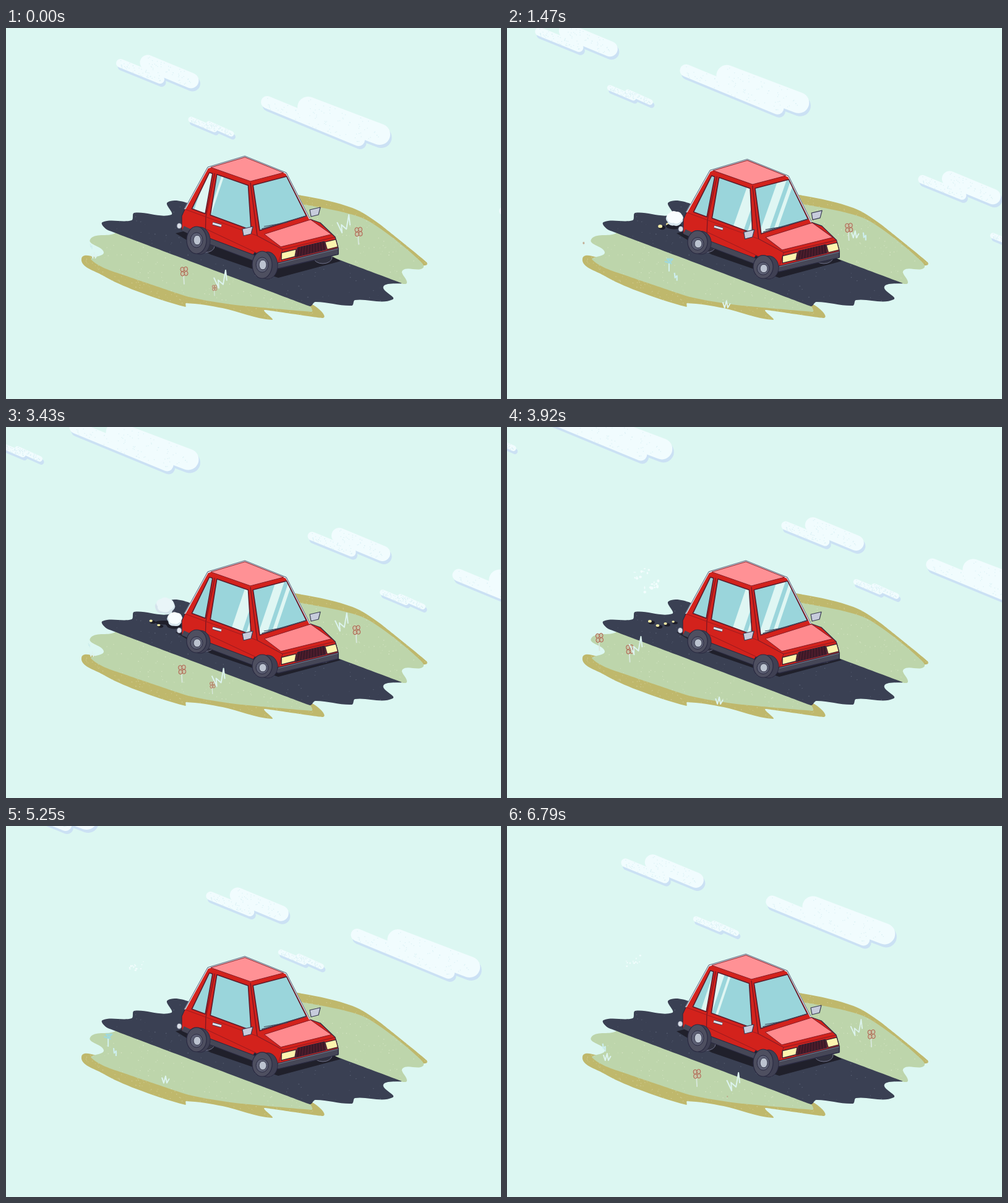
An HTML page with a canvas that plays this animation: 800x600 px, repeating every 6860 ms.

```html
<!DOCTYPE html>
<html>
<head>
<meta charset="utf-8">
<style>
html, body { margin: 0; width: 100%; height: 100%; overflow: hidden; background: #dcf7f2; }
canvas { display: block; }
</style>
</head>
<body>
<canvas id="stage" width="800" height="600"></canvas>
<script>
const stage = document.getElementById('stage');
let g = stage.getContext('2d');
const LOOP = 6860, STEP = 70, LANE = LOOP / 2;
const SPEED = 0.276, SLOPE = 0.38;
const NAVY = '#2b2b42', RED = '#d3221c', WINE = '#861b25', SLATE = '#464757';

const clamp = v => Math.max(0, Math.min(1, v));
const mix = (a, b, u) => [a[0] + (b[0] - a[0]) * u, a[1] + (b[1] - a[1]) * u];

// eased 0 to 1 between two times
function ramp(t, from, to) {
  const u = clamp((t - from) / (to - from));
  return u * u * (3 - 2 * u);
}

function random(seed) {
  return () => {
    seed = (seed * 16807) % 2147483647;
    return seed / 2147483647;
  };
}

function poly(points, fill, line, width = 1, open) {
  g.beginPath();
  for (const [x, y] of points) g.lineTo(x, y);
  if (!open) g.closePath();
  if (fill) { g.fillStyle = fill; g.fill(); }
  if (line) { g.strokeStyle = line; g.lineWidth = width; g.stroke(); }
}

const stroke = (points, color, width) => poly(points, null, color, width, true);

function oval(x, y, rx, ry, fill, line, width = 1) {
  g.beginPath();
  g.ellipse(x, y, rx, ry, 0, 0, 7);
  if (fill) { g.fillStyle = fill; g.fill(); }
  if (line) { g.strokeStyle = line; g.lineWidth = width; g.stroke(); }
}

// ---- ground ----

// closed curve through all points; long sides stay straight
function curve(p, fill) {
  const n = p.length;
  const at = i => p[(i + n) % n];
  const tangent = i => {
    const a = at(i - 1), b = at(i + 1), d = Math.hypot(b[0] - a[0], b[1] - a[1]);
    return [(b[0] - a[0]) / d, (b[1] - a[1]) / d];
  };
  g.beginPath();
  g.moveTo(...at(0));
  for (let i = 0; i < n; i++) {
    const a = at(i), b = at(i + 1), s = tangent(i), e = tangent(i + 1);
    const len = Math.hypot(b[0] - a[0], b[1] - a[1]);
    const k = len > 90 ? 3 : len * 0.32;
    g.bezierCurveTo(a[0] + s[0] * k, a[1] + s[1] * k, b[0] - e[0] * k, b[1] - e[1] * k, b[0], b[1]);
  }
  g.fillStyle = fill;
  g.fill();
}

// a filled curve with random specks inside
function land(points, fill, count, color) {
  curve(points, fill);
  const r = random(count + points.length);
  g.save();
  g.clip();
  g.fillStyle = color;
  for (let i = 0; i < count; i++) {
    const s = 0.5 + r();
    g.fillRect(120 + r() * 570, 265 + r() * 215, s, s);
  }
  g.restore();
}

const olive = points => land(points, '#bfb86c', 2200, '#cfca8f');
const grass = points => land(points, '#bdd5ab', 900, '#d5e4c3');

function paintGround() {
  olive([[122, 373], [156, 400], [210, 425], [290, 451], [291, 445], [350, 453], [430, 472], [418, 456],
    [512, 469], [490, 445], [300, 420], [160, 376]]);
  grass([[165, 326], [176, 332], [136, 342], [158, 363], [138, 375], [200, 403], [292, 434], [380, 449],
    [494, 459], [490, 449]]);
  olive([[450, 272], [478, 271], [560, 291], [605, 318], [680, 379], [640, 376], [500, 310]]);
  grass([[450, 285], [484, 286], [570, 305], [610, 328], [664, 372], [674, 388], [641, 392], [648, 412],
    [638, 413], [460, 345]]);
  land([[156, 314], [203, 311], [207, 299], [267, 302], [261, 282], [296, 284], [638, 412], [610, 418],
    [625, 439], [564, 440], [559, 449], [500, 443], [491, 450], [165, 327]], '#3a4053', 420, '#596074');
}

const ground = document.createElement('canvas');
ground.width = 800;
ground.height = 600;
const view = g;
g = ground.getContext('2d');
paintGround();
g = view;

// ---- clouds ----

// two bars each: start, end, radius
const CLOUDS = [
  [[[185, 57], [249, 83], 7], [[229, 56], [299, 85], 12.5]],
  [[[422, 120], [570, 181], 10], [[488, 128], [604, 172], 17]],
  [[[299, 148], [337, 164], 4.5], [[328, 155], [364, 171], 4.5]]
];

function cloud(bars, x, y) {
  g.lineCap = 'round';
  for (const [dx, dy, color] of [[2.5, 5, '#cbe1f4'], [0, 0, '#f1fcfe']]) {
    g.save();
    g.translate(x + dx, y + dy);
    for (const [a, b, r] of bars) stroke([a, b], color, r * 2);
    g.restore();
  }
  const rnd = random(77);
  g.fillStyle = '#d8f0f4';
  for (const [a, b, r] of bars)
    for (let i = 0; i < 45; i++) {
      const [px, py] = mix(a, b, rnd());
      g.fillRect(x + px, y + py + (rnd() * 2 - 1) * r * 0.9, 1.2, 1.2);
    }
}

function clouds(t) {
  for (let k = 0; k < 2; k++)
    for (const bars of CLOUDS) cloud(bars, 619 * (k - t / LOOP), 239 * (k - t / LOOP));
}

// ---- plants ----

const PLANTS = {
  flower() {
    stroke([[0, 0], [-1, -16]], '#d8e8de', 1.8);
    for (let i = 0; i < 4; i++) {
      const a = i * Math.PI / 2 + 0.7;
      oval(Math.cos(a) * 4, -21 + Math.sin(a) * 5, 3, 3.6, '#c5c6a6', '#b05a48', 1);
    }
  },
  grass() {
    stroke([[-10, -20], [-2, -3], [-3, -16], [5, -9], [9, -32], [11, -15]], '#dcf3ee', 2);
  },
  tuft() {
    stroke([[-7, -11], [-4, -2], [-1, -13], [1, -2], [5, -9]], '#dcf3ee', 2);
  },
  blade() {
    stroke([[-2, -13], [-1, -5], [2, -8], [2, 0]], '#cdeeee', 2.2);
  },
  teal() {
    stroke([[0, 0], [0, -14]], '#d2f0ee', 2);
    stroke([[-7, -16], [0, -14], [6, -20], [-3, -20], [4, -12]], '#9fd9dd', 2.4);
  }
};

// gate: a spot on the lane; times: when each plant passes it
const NEAR = {
  gate: 360, fade: 117,
  flower: { y: 442, sprout: 362, times: [622, 1932, 2407, 3169, 3347] },
  grass: { y: 429, sprout: 420, times: [3379] },
  tuft: { y: 456, sprout: 400, times: [444, 1462, 2646] },
  blade: { y: 442, sprout: 430, times: [1161, 2186, 2624] },
  teal: { y: 431, sprout: 340, times: [1122] }
};
const FAR = {
  gate: 600, fade: 470,
  flower: { y: 362, sprout: 695, times: [1306, 3321] },
  grass: { y: 355, sprout: 600, times: [2316, 3231] },
  tuft: { y: 355, sprout: 640, times: [1056, 1346] },
  blade: { y: 352, sprout: 640, times: [1397, 2178, 2666] },
  teal: { y: 361, sprout: 660, times: [2530] }
};

function plants(lane, phase) {
  for (const kind in PLANTS) {
    const { y, sprout, times } = lane[kind];
    for (const time of times) {
      const age = (phase - time + LANE * 1.5) % LANE - LANE / 2;
      const way = SPEED * age, x = lane.gate - way;
      const size = clamp((sprout - x) / 40) * clamp((x - lane.fade) / 32);
      if (size < 0.03) continue;
      g.save();
      g.translate(x, y - way * SLOPE);
      g.scale(size, size);
      PLANTS[kind]();
      g.restore();
    }
  }
}

// ---- exhaust ----

const PUFFS = [1370, 2040, 3155, 3355, 4190, 4405, 5380, 5860];

function ball(r, color, lift, rnd) {
  for (let i = 0; i < 6; i++) {
    const a = i * 1.05 + rnd() * 0.5;
    oval(Math.cos(a) * r * 0.42, Math.sin(a) * r * 0.32 + lift, r * 0.58, r * 0.5, color);
  }
}

function smoke(t) {
  for (const start of PUFFS) {
    const age = t - start;
    if (age < 0 || age > 950) continue;
    const rnd = random(start), r = 18 - 11 * Math.exp(-age / 80) - age * 0.005;
    if (age < 480) oval(278 - 0.08 * age, 323 - age * 0.025, r * 0.9, 6 - age / 100, '#1f1f2b');
    g.save();
    g.translate(279 - 0.08 * age, 318 - 0.107 * age);
    if (age < 480) {
      ball(r, '#d5e4ec', 1.5, rnd);
      ball(r * 0.9, age < 230 ? '#f8fdff' : '#e9f5f8', -1, rnd);
    } else {
      const fade = 1.4 - age / 1000;
      for (let i = 0; i < 13; i++) {
        const u = rnd() * 2 - 1;
        oval(u * 12, rnd() * 12 - 6 - u * 5, (1 + rnd() * 2.5) * fade, (1 + rnd() * 2.5) * fade, '#f2fdfd');
      }
    }
    g.restore();
  }
}

function sparks(t) {
  for (let i = 0; i < 24; i++) {
    const u = (t - 1120 - i * 150) / 620, rnd = random(500 + i * 3700);
    rnd();
    if (u < 0.1 || u > 1) continue;
    const x = 277 - u * 52, y = 313 + rnd() * 10, s = (2 + rnd() * 3.5) * (1 - u * 0.5);
    oval(x + 3, y + 2, s + 2, s, '#1d1d29');
    oval(x, y, s, s * 0.75, '#f4eca6');
  }
}

// ---- car ----

// roof corners, windscreen foot, bonnet front, bumper line
const ROOF_L = [326, 226], ROOF_T = [386, 208], ROOF_R = [453, 235], ROOF_F = [395, 250];
const TAIL = [289, 293], FOOT_L = [406, 336], FOOT_R = [491, 309];
const NOSE_L = [447, 358], NOSE_R = [532, 338], BASE_L = [440, 380], BASE_R = [537, 356];

const SIDE = [ROOF_L, ROOF_F, FOOT_L, TAIL];
const SCREEN = [ROOF_F, ROOF_R, FOOT_R, FOOT_L];
const BONNET = [FOOT_L, FOOT_R, NOSE_R, NOSE_L];
const NOSE = [NOSE_L, NOSE_R, BASE_R, BASE_L];

const spot = (q, u, v) => mix(mix(q[0], q[1], u), mix(q[3], q[2], u), v);

// part of a four-sided face: top from a to b, bottom from c to d, rows v to w
const patch = (q, a, b, c, d, v, w) => [spot(q, a, v), spot(q, b, v), spot(q, d, w), spot(q, c, w)];

const drop = ([x, y], d) => [x, y + d];

function glass(shape, glints, shift) {
  poly(shape, '#9ad5db');
  g.save();
  g.clip();
  for (const [x, w] of glints) {
    const a = x + shift;
    poly([[a, 330], [a + w, 330], [a + w + 32, 235], [a + 32, 235]], '#dff6f3');
  }
  g.restore();
  poly(shape, null, '#5c1b2b', 1.6);
}

function mirror(x, y) {
  poly([[x, y], [x + 17, y - 4], [x + 14, y + 8], [x + 2, y + 11]], '#c7ccdc', '#3b3e55', 1.2);
}

function body(shift) {
  poly([ROOF_L, ROOF_T, ROOF_R, FOOT_R, [508, 315], NOSE_R, BASE_R, drop(BASE_R, 9), drop(BASE_L, 6), [402, 363],
    [397, 371], [322, 343], [284, 327], [284, 304], TAIL], RED, NAVY, 1.2);
  stroke([[286, 324], [297, 329]], SLATE, 8);

  stroke([TAIL, ROOF_L, ROOF_T, ROOF_R, FOOT_R], '#dcecf1', 2.4);
  stroke([TAIL, ROOF_L, ROOF_T, ROOF_R, FOOT_R].map(p => drop(p, -1)), '#4c526a', 0.9);
  poly(patch([ROOF_L, ROOF_T, ROOF_R, ROOF_F], 0.06, 0.98, 0.06, 0.98, 0.02, 0.95), '#ff9195', WINE);

  glass(patch(SIDE, 0.08, 0.15, 0.08, 0.27, 0.085, 0.94), [[360, 19]], shift);
  glass(patch(SIDE, 0.24, 0.94, 0.34, 0.92, 0.07, 0.93), [[360, 19], [386, 4]], shift);
  glass(patch(SCREEN, 0.06, 0.97, 0.06, 0.97, 0.06, 0.92), [[406, 14], [427, 6]], shift);
  stroke([ROOF_F, FOOT_L], '#7e1722', 1.5);
  stroke([spot(SIDE, 0.19, 0.06), spot(SIDE, 0.29, 1), [322, 341]], '#7e1722', 1.3);
  stroke([TAIL, FOOT_L], '#9d1a1e', 1);
  stroke([[323, 325], BASE_L], '#991a1e', 1);
  stroke([[324, 343], [401, 372]], NAVY, 10);
  stroke([[324, 343], [401, 372]], SLATE, 8);
  stroke([[334, 316], [348, 320]], '#4a4256', 5);
  stroke([[334, 316], [348, 320]], '#dfe3ed', 3);

  poly(patch(BONNET, 0.12, 1, 0.04, 1, 0.03, 0.85), '#ff8a8e', WINE);
  stroke([FOOT_L, NOSE_L, NOSE_R], WINE, 1.2);
  stroke([NOSE_L, BASE_L], WINE, 1);
  poly(patch(NOSE, 0.29, 0.79, 0.28, 0.8, 0.15, 0.88), '#4b1c2b', NAVY);
  for (let u = 0.32; u < 0.8; u += 0.05) stroke([spot(NOSE, u, 0.15), spot(NOSE, u, 0.85)], '#2b1522', 1);
  poly(patch(NOSE, 0, 0.27, 0.04, 0.27, 0.25, 0.82), '#fdf3ae', '#3c2433', 1.3);
  poly(patch(NOSE, 0.8, 1, 0.82, 1, 0.22, 0.88), '#fdf3ae', '#3c2433', 1.3);
  poly([[433, 378], BASE_L, BASE_R, drop(BASE_R, 10), drop(BASE_L, 9), [434, 386]], SLATE, NAVY, 1.3);
  stroke([drop(BASE_L, 1), drop(BASE_R, 1)], '#7b7c8d', 1);

  stroke([spot(SCREEN, 0.1, 0.9), spot(SCREEN, 0.98, 0.92)], '#42475c', 1.4);
  stroke([spot(SCREEN, 0.15, 0.87), spot(SCREEN, 0.6, 0.93)], '#42475c', 1.2);
  mirror(382, 325);
  mirror(491, 294);
  oval(280, 320, 4, 4.5, '#d9dfe8', '#555a70');
}

// tyres stay on the road and flatten as the body sinks
function wheel(x, y, depth, sink) {
  const ry = 22 - sink / 2, mid = y + sink / 2;
  oval(x + depth, mid + 1, 16, ry, '#3f4053', NAVY);
  oval(x, mid, 16, ry, '#4e4f60', NAVY, 1.2);
  oval(x, y + sink * 0.9, 10, ry * 0.55, '#5d6074', NAVY);
  oval(x + 1, y + sink * 0.9, 6, ry * 0.36, '#bcc3d0', '#343649');
}

function glintShift(t) {
  if (t > 500 && t < 5400) return 110 * (1 - ramp(t, 500, 1400)) - 125 * ramp(t, 4350, 5400);
  return 58 - 0.15 * ((t < 5400 ? t + LOOP : t) - 6020);
}

function car(t) {
  const dy = 9 * ramp(t, 300, 2450) - 12 * ramp(t, 4600, 6020) + 3 * ramp(t, 6020, 6790);
  const lean = -2 * Math.sin(t / 1960 * 2 * Math.PI) * (1 - ramp(t, 2450, 3430));
  const sink = Math.max(-1, Math.min(7, dy * 1.3));

  poly([[274, 332], [290, 328], [510, 360], [541, 377], [440, 404], [330, 366]], '#20202b');
  oval(322, 353, 15, 10, '#30313f', '#70728a');
  oval(512, 371, 15, 10, '#30313f', '#70728a');

  g.save();
  g.transform(1, 0, -lean / 150, 1, 380 * lean / 150, dy);
  body(glintShift(t));
  g.restore();
  wheel(308, 343, 6, sink);
  wheel(414, 383, 9, sink);
}

function frame(now) {
  const t = Math.floor((now % LOOP) / STEP) * STEP;
  const phase = (t + 12 * Math.sin(Math.PI * t / LOOP)) % LANE;
  g.fillStyle = '#dcf7f2';
  g.fillRect(0, 0, 800, 600);
  g.lineJoin = 'round';
  clouds(t);
  g.lineCap = 'butt';
  g.drawImage(ground, 0, 0);
  plants(FAR, phase);
  plants(NEAR, phase);
  sparks(t);
  smoke(t);
  car(t);
}

const begin = performance.now();
function tick() {
  frame(performance.now() - begin);
  requestAnimationFrame(tick);
}
tick();
</script>
</body>
</html>
```
